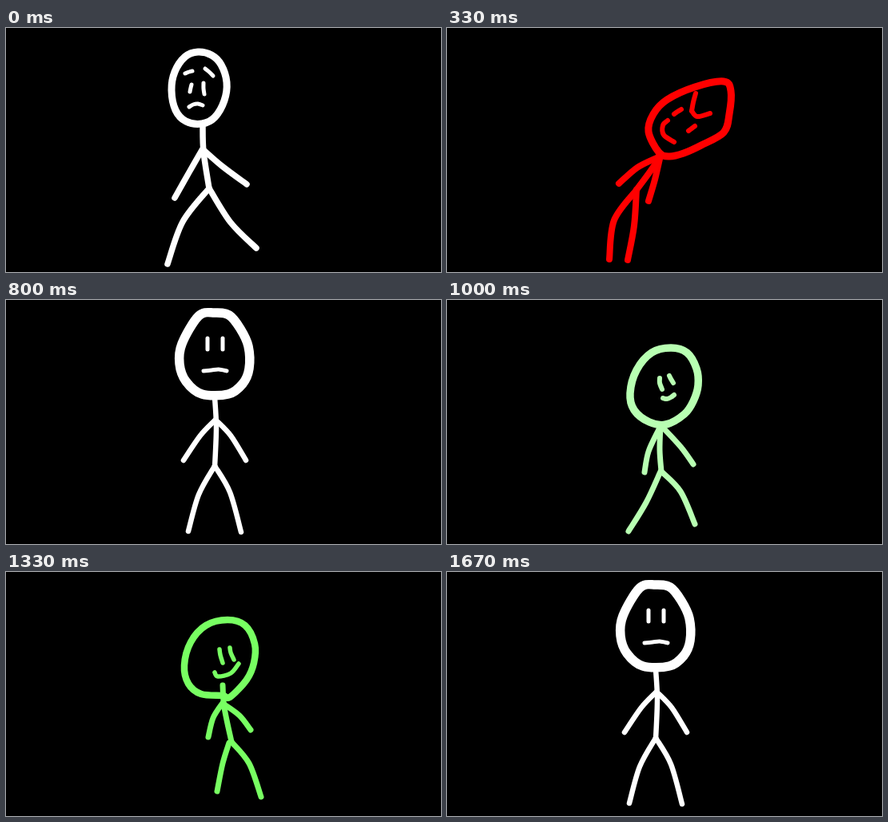
An HTML page with a canvas that plays this animation: 544 px wide and 306 px high, repeating every 1790 ms.

```html
<!DOCTYPE html>
<html lang="en">
<head>
<meta charset="utf-8">
<title>Stick figure</title>
<style>
  html, body { margin: 0; width: 100%; height: 100%; overflow: hidden; background: #000; }
  canvas { display: block; width: 544px; height: 306px; }
</style>
</head>
<body>
<canvas id="stage" width="544" height="306"></canvas>
<script>
const ctx = document.getElementById('stage').getContext('2d');
const LOOP = 1790;

// Each part is a flat list of x, y points; widths are [head, limbs, face].
const worried = {
  color: [255, 255, 255], widths: [9, 7.5, 5],
  head: [240,30, 257,34, 269,46, 276,68, 273,91, 261,112, 245,120, 225,117, 212,103, 207,78, 211,55, 224,36],
  browL: [224,57, 229,55, 233,54], browR: [249,51, 254,55, 259,60],
  eyeL: [232,71, 231,75, 230,80], eyeR: [247,69, 247,76, 248,83],
  mouth: [229,99, 234,96, 240,95, 246,97],
  spine: [246,122, 247,155, 254,201],
  armL: [245,153, 229,181, 211,213], armR: [246,152, 270,173, 301,196],
  legL: [254,201, 221,243, 202,296], legR: [254,201, 281,244, 313,276]
};
const angry = {
  color: [255, 0, 0], widths: [9, 8, 6],
  head: [346,67, 355,79, 353,108, 346,131, 318,147, 296,157, 278,161, 265,156, 252,130, 258,108, 275,90, 310,74],
  browL: [311,82, 308,93, 306,104], browR: [306,104, 313,111, 329,107],
  eyeL: [293,102, 288,105, 284,108], eyeR: [310,123, 306,126, 302,129],
  mouth: [276,116, 270,122, 271,134, 284,143],
  spine: [266,162, 254,180, 237,203],
  armL: [262,163, 238,175, 215,195], armR: [266,164, 260,190, 252,217],
  legL: [237,203, 209,241, 203,290], legR: [237,203, 234,248, 226,291]
};
const sulky = {
  color: [255, 192, 195], widths: [8.5, 7, 5.5],
  head: [301,63, 322,67, 333,84, 334,105, 325,129, 310,142, 285,148, 258,144, 247,129, 247,105, 259,84, 277,69],
  browL: [293,79, 296,82, 299,86], browR: [316,94, 312,99, 320,108],
  eyeL: [289,98, 284,103, 279,108], eyeR: [302,114, 299,118, 295,122],
  mouth: [265,117, 270,121, 275,126, 280,132],
  spine: [264,139, 256,168, 244,199],
  armL: [262,157, 238,172, 215,193], armR: [262,157, 269,183, 282,208],
  legL: [242,200, 211,248, 202,294], legR: [244,199, 252,241, 279,306]
};
const calm = {
  color: [255, 255, 255], widths: [11.5, 6.5, 5],
  head: [261,16, 279,19, 293,36, 303,58, 304,86, 296,105, 278,118, 245,118, 225,102, 217,80, 220,55, 241,20],
  eyeL: [252,48, 252,55, 252,62], eyeR: [271,48, 271,55, 271,62],
  mouth: [247,89, 257,88, 266,87, 276,89],
  spine: [261,122, 263,160, 261,210],
  armL: [261,151, 243,170, 222,201], armR: [263,151, 281,170, 300,201],
  legL: [261,208, 241,244, 228,290], legR: [261,208, 280,241, 294,291]
};
const content = {
  color: [184, 255, 178], widths: [9.5, 7, 6],
  head: [280,60, 300,66, 312,86, 314,107, 308,127, 297,143, 274,156, 253,153, 234,138, 229,117, 237,88, 256,66],
  eyeL: [266,98, 266,104, 269,112], eyeR: [278,95, 280,99, 283,104],
  mouth: [270,123, 275,124, 280,122, 284,119],
  spine: [267,157, 266,188, 268,215],
  armL: [265,162, 252,190, 247,216], armR: [270,160, 293,185, 308,206],
  legL: [267,215, 249,254, 227,290], legR: [268,215, 292,240, 310,281]
};
const happy = {
  color: [120, 255, 98], widths: [8.5, 7, 5.5],
  head: [277,60, 299,67, 311,90, 310,114, 301,135, 280,157, 271,155, 244,153, 228,140, 223,117, 231,88, 250,67],
  eyeL: [267,97, 268,104, 271,114], eyeR: [280,95, 281,101, 285,110],
  mouth: [261,126, 265,131, 281,127, 291,115],
  spine: [271,142, 273,170, 282,213],
  armL: [271,164, 259,183, 253,207], armR: [273,166, 292,180, 306,198],
  legL: [279,214, 271,240, 264,275], legR: [282,213, 304,240, 319,282]
};

// Key poses; ease shapes the move towards the next key.
const keys = [
  { at: 0, pose: worried, ease: 1 },
  { at: 330, pose: angry, ease: 1 },
  { at: 530, pose: sulky, ease: 1 },
  { at: 800, pose: calm, ease: 1 },
  { at: 1000, pose: content, ease: 1 },
  { at: 1330, pose: happy, ease: 2 },
  { at: 1670, pose: calm, ease: 1 }
];
// The drawing is held between these times.
const steps = [0, 130, 200, 330, 470, 530, 670, 800, 870, 1000, 1130, 1200, 1330, 1470, 1530, 1670];

const lerp = (a, b, m) => a.map((v, i) => v + (b[i] - v) * m);

function blend(a, b, m) {
  if (m === 0) return a;
  const out = {};
  for (const part in a) if (b[part]) out[part] = lerp(a[part], b[part], m);
  return out;
}

function poseAt(t) {
  const i = keys.findLastIndex(k => k.at <= t);
  const from = keys[i], to = keys[i + 1];
  if (!to) return from.pose;
  return blend(from.pose, to.pose, ((t - from.at) / (to.at - from.at)) ** from.ease);
}

// Smooth stroke through all points.
function curve(p, width, closed) {
  const n = p.length / 2;
  const pt = i => {
    const j = closed ? (i + n) % n : Math.max(0, Math.min(n - 1, i));
    return [p[2 * j], p[2 * j + 1]];
  };
  ctx.lineWidth = width;
  ctx.beginPath();
  ctx.moveTo(p[0], p[1]);
  for (let i = 0; i < (closed ? n : n - 1); i++) {
    const [a, b, c, d] = [pt(i - 1), pt(i), pt(i + 1), pt(i + 2)];
    ctx.bezierCurveTo(
      b[0] + (c[0] - a[0]) / 6, b[1] + (c[1] - a[1]) / 6,
      c[0] - (d[0] - b[0]) / 6, c[1] - (d[1] - b[1]) / 6,
      c[0], c[1]);
  }
  if (closed) ctx.closePath();
  ctx.stroke();
}

function draw(pose) {
  const [head, limb, face] = pose.widths;
  ctx.fillStyle = '#000';
  ctx.fillRect(0, 0, 544, 306);
  ctx.strokeStyle = `rgb(${pose.color.map(Math.round)})`;
  ctx.lineCap = ctx.lineJoin = 'round';
  curve(pose.head, head, true);
  for (const part of ['browL', 'browR', 'eyeL', 'eyeR', 'mouth'])
    if (pose[part]) curve(pose[part], face);
  for (const part of ['spine', 'armL', 'armR', 'legL', 'legR'])
    curve(pose[part], limb);
}

const start = performance.now();
function tick() {
  const t = (performance.now() - start) % LOOP;
  draw(poseAt(steps.findLast(s => s <= t)));
  requestAnimationFrame(tick);
}
tick();
</script>
</body>
</html>
```
